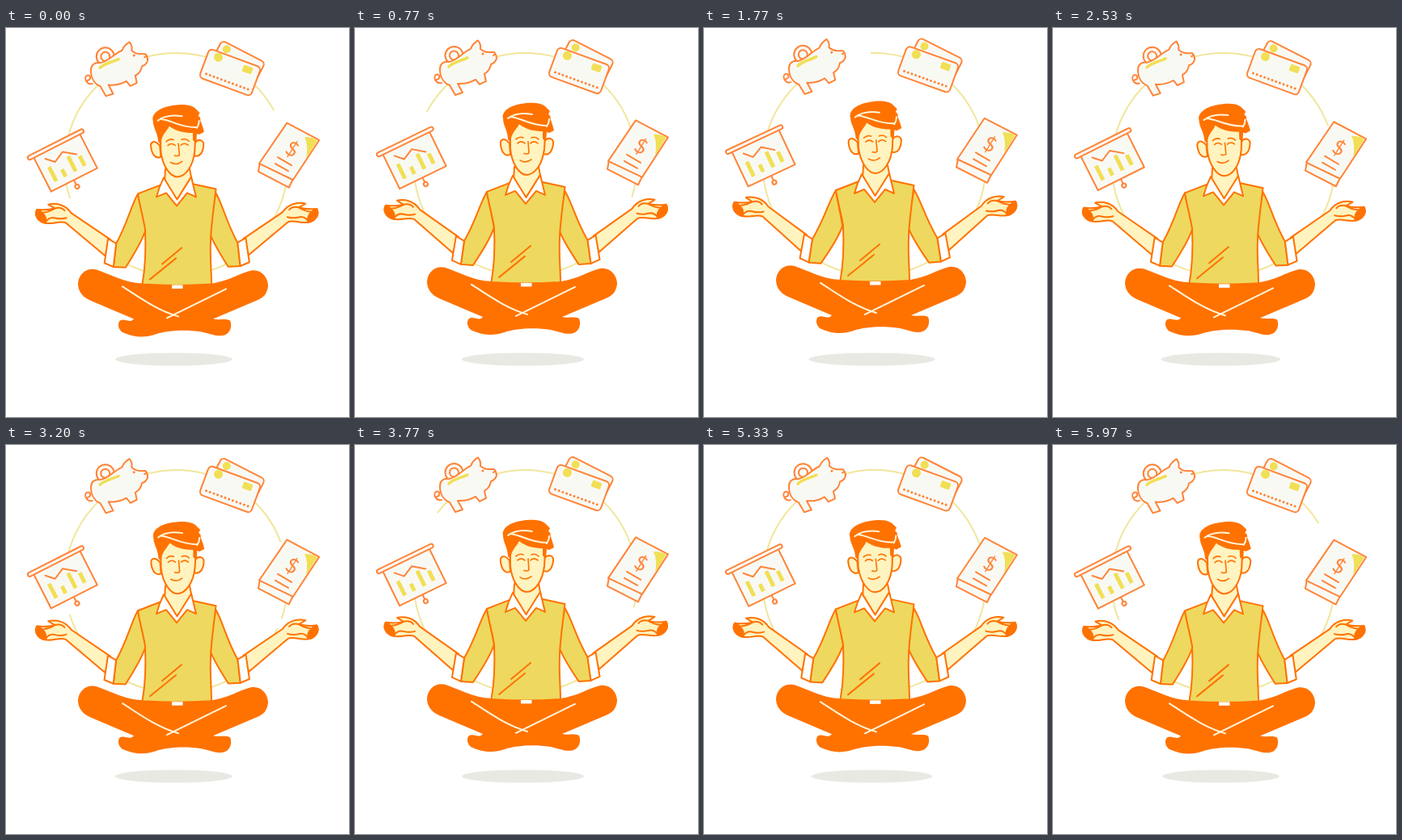
Animation of 424x482 px, one loop 6.01 s. Source, as an HTML page:

```html
<!DOCTYPE html>
<html lang="en">
<head>
<meta charset="utf-8">
<title>Meditating with money matters</title>
<style>
  html, body { margin: 0; width: 100%; height: 100%; overflow: hidden; background: #fff; }
  svg { display: block; width: 424px; height: 482px; }
  .ink { stroke: #ff7200; stroke-width: 2; stroke-linejoin: round; stroke-linecap: round; }
  .icon { stroke: #ff8438; stroke-width: 2; stroke-linejoin: round; stroke-linecap: round; fill: #f9f9f4; }
  .none { fill: none; }
  .skin { fill: #fff3bf; }
  .shirt { fill: #eed860; }
  .white { fill: #fff; }
  .orange { fill: #ff7200; }
  .gold { fill: #f1df55; stroke: none; }
  .pale { fill: none; stroke: #fff6da; stroke-width: 2; stroke-linecap: round; }
  .dot { fill: #ff8438; stroke: none; }
</style>
</head>
<body>
<svg viewBox="0 0 424 482">
  <defs>
    <g id="arm">
      <g id="armTurn" class="ink">
        <path class="skin" d="M128 259L80 225C73 214 61 212 52 214L60 219C52 221 46 221 38 220C34 227 39 235 48 237C57 239 66 234 73 237L121 279Z"/>
        <path class="orange" d="M38 220C34 227 39 235 48 237C50 233 48 227 45 225Q42 221 38 220Z"/>
        <path class="none" d="M60 219Q68 217 72 222M48 236Q53 229 60 231T74 231M45 224Q54 223 60 219"/>
        <path class="shirt" d="M163 203C154 218 150 238 135 264L131 293L146 294C156 279 168 260 172 247Z"/>
        <path class="white" d="M125 258L135 264L131 293L120 288Z"/>
      </g>
    </g>
  </defs>

  <ellipse id="shadow" cx="207.5" cy="410.5" ry="8" fill="#e9e9e3"/>
  <circle id="ring" cx="210.5" cy="169" r="138" fill="none" stroke="#f1e69c" stroke-width="2"
    pathLength="360" stroke-dasharray="155.6 14.4 26 5 138 21"/>

  <g id="chart" class="icon">
    <g transform="translate(29 157) rotate(-26)">
      <path class="none" d="M36.5 49V56"/>
      <circle cx="36.5" cy="58.5" r="2.6"/>
      <rect x="5" y="1" width="64" height="48.500"/>
      <rect x="-2" y="-2.5" width="77" height="5" rx="2.5"/>
      <path class="none" d="M17 10L26 19L40 12L54 22.500"/>
      <path class="gold" d="M14 21h5v20h-5zM27 31h5v10h-5zM41 20h5v21h-5zM54 26h5v14h-5z"/>
    </g>
  </g>

  <g id="pig" class="icon">
    <circle cx="122.500" cy="34" r="11"/>
    <circle cx="122.500" cy="34" r="5.500"/>
    <path d="M105 51C105 45 109 41 116 42C127 40 132 31 143 26Q145 20 152 15.500Q156 20 155 26Q160 30 165 30L172 30Q175 33 175 38Q173 44 168 45Q167 53 160 57L162 66L154 70L149 64Q139 70 127 69L133 80L124 83L117 71C109 68 105 60 105 51Z"/>
    <path class="none" d="M107 68C100 70 96 61 100 58C105 56 106 63 101 64"/>
    <path class="none" d="M116 48C122 42 131 41 139 37" style="stroke:#f1df55;stroke-width:3.500"/>
    <circle class="dot" cx="158" cy="32" r="1.500"/>
    <path class="none" d="M171 34L173 33"/>
  </g>

  <g id="cards" class="icon">
    <g transform="translate(285 44) rotate(27)">
      <rect x="-30" y="-19" width="60" height="38" rx="5"/>
      <circle class="gold" cx="-20" cy="-12" r="5"/>
    </g>
    <g transform="translate(277 53) rotate(20)">
      <rect x="-34" y="-19" width="68" height="38" rx="5"/>
      <circle class="gold" cx="-20" cy="-12.500" r="5.500"/>
      <rect class="gold" x="13" y="-15" width="12" height="8.500" rx="1.500"/>
      <path class="none" d="M-27 12H28.500" stroke-dasharray="0 5" style="stroke-width:3"/>
    </g>
  </g>

  <g id="book" class="icon">
    <path d="M314 164L312 175L350 194.500L355 184Z"/>
    <path d="M347 114.500L387 135.500L355 185L313 165Z"/>
    <path class="gold" d="M369 132Q380 132 384.500 136L371 158.500Q374 142 369 132Z"/>
    <path class="none" d="M336 157L353 167M333 165L349 174"/>
    <text class="dot" transform="translate(353.500 147) rotate(28)" y="8.500" text-anchor="middle" font-family="Lato, sans-serif" font-size="25">$</text>
  </g>

  <g id="body">
    <use href="#arm"/>
    <use href="#arm" transform="translate(422.500 -1) scale(-1 1)"/>
    <path class="orange" d="M112 297C128 302 145 313 169 314H255C275 311 287 302 303 298C315 296 324 306 324 317C323 327 318 332 310 335L256 358C263 360 271 357 277 360C280 367 277 376 270 378C262 381 252 376 242 374C222 371 200 372 185 377C173 381 160 382 143 374C138 369 138 363 141 360C147 357 153 364 158 358L104 335C95 331 89 324 89 314C90 302 100 294 112 297Z"/>
    <path class="pale" d="M144 318C166 332 186 347 213 355M272 321L199 357"/>
    <path class="ink shirt" d="M163 203L194 191H232L259.500 197C257 220 253 245 253 262C252 280 254 300 254 315Q211 318 168.500 315C172 296 173 270 172 247C169 229 165 217 163 203Z"/>
    <rect class="white" x="205" y="316" width="13.500" height="4.500"/>
    <path class="ink none" d="M193 290L217 270M178 309L210 283"/>
    <path class="ink skin" d="M197 172L196 190L211 210L230 188L227 172Z"/>
    <path class="ink white" d="M195 183Q189 195 186 207L198 202L211 218L224 202L235 207L229 182L211.500 210Z"/>

    <g id="head">
      <path class="ink skin" d="M191 143C184 135 179 138 180 145C181 153 185 160 192 157ZM234 140C240 134 246 138 245 144C244 152 240 159 233 156Z"/>
      <path class="ink skin" d="M192 118L192 150C194 170 204 182 212 182C222 182 232 169 234 150L236 118Z"/>
      <path class="orange" d="M183 112C181 103 192 96 205 94C216 92 229 92 235 97L241 103L239 107C243 109 241 112 242 114C244 119 245 123 246 127L240 130L237 129L236 141L232 137L232 128C223 128 211 126 203 119C200 126 194 128 192 141L189 138C189 127 183 121 183 112Z"/>
      <path class="pale" d="M189 112C197 106 208 105 219 107M192 110C205 111 216 121 236 121M240 113Q240 118 237 122"/>
      <path class="ink none" style="stroke-width:1.600" d="M201 143Q205 139 210 143M217 143Q221 139 226 143M199 138Q203 134 208 136M218 136Q223 134 227 138M214 141L215 155Q213 157 209 155.500M204 164Q211 168.500 218 163"/>
    </g>
  </g>
</svg>
<script>
  const LOOP = 6010;
  const el = id => document.getElementById(id);
  const move = (id, value) => el(id).setAttribute('transform', value);
  // id, bob height, tilt in degrees, pivot
  const icons = [
    ['chart', 3.2, -1, 68, 163],
    ['pig', 1.6, 1, 137, 50],
    ['cards', 2, 0.3, 280, 50],
    ['book', 3.2, 0.4, 350, 155]
  ];

  function draw(t) {
    const phase = t / LOOP * 4 * Math.PI;
    const low = Math.cos(phase), sway = Math.sin(phase);
    for (const [id, bob, tilt, x, y] of icons)
      move(id, `translate(0 ${bob * low}) rotate(${tilt * low} ${x} ${y})`);
    move('body', `translate(0 ${2.4 * low})`);
    move('armTurn', `rotate(${-1.15 * low} 163 203)`);
    move('head', `rotate(${sway - 1} 211 190)`);
    move('ring', `rotate(${t / LOOP * 360 - 8} 210.5 169)`);
    el('shadow').setAttribute('rx', 75.5 - 3.2 * low);
  }

  const start = performance.now();
  function tick() {
    draw((performance.now() - start) % LOOP);
    requestAnimationFrame(tick);
  }
  tick();
</script>
</body>
</html>
```
